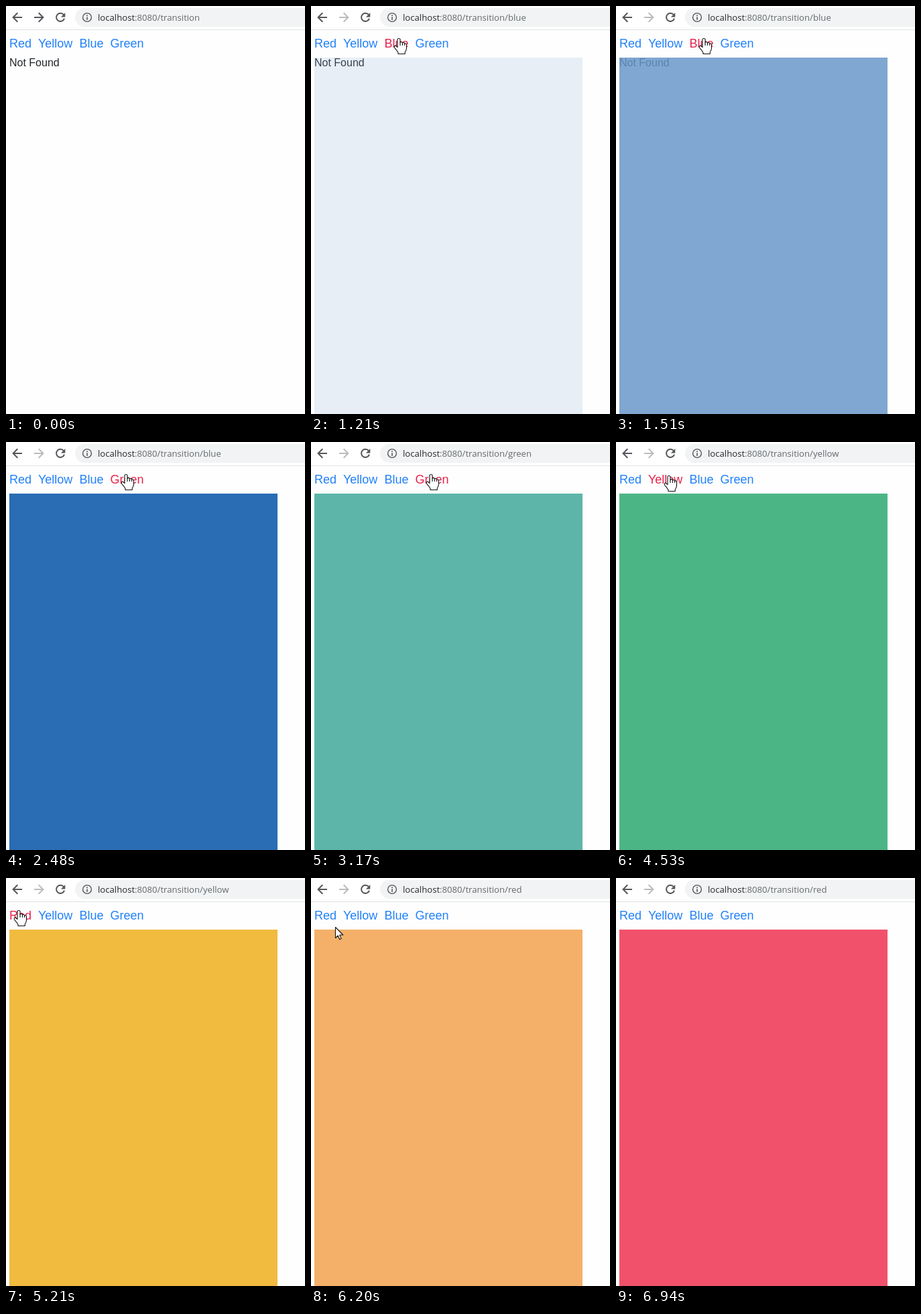
An HTML page for the animation above (7210 ms loop, 446x609 px).

```html
<!DOCTYPE html>
<html lang="en">
<head>
<meta charset="utf-8">
<title>Route transition</title>
<style>
html, body { margin: 0; width: 100%; height: 100%; overflow: hidden; background: #fefefe; }
svg { display: block; }
.icon { fill: none; stroke: #54575b; stroke-width: 2; }
.url { font: 13.15px "Open Sans", "Noto Sans", sans-serif; fill: #666a6e; }
.host { fill: #27282b; }
.link { font: 18px "Liberation Sans", Arial, sans-serif; fill: #2080f8; }
.link.hover { fill: #e6214b; }
.plain { font: 16px "Liberation Sans", Arial, sans-serif; fill: #212529; }
#cursor path { fill: #fff; stroke: #111; stroke-width: 1.1; stroke-linejoin: round; }
#hand .knuckles { fill: none; }
</style>
</head>
<body>
<svg width="446" height="609" viewBox="0 0 446 609">
  <rect width="446" height="35" fill="#fff"/>
  <rect y="35" width="446" height="1" fill="#dfe1e3"/>
  <rect x="103" y="3" width="380" height="28" rx="14" fill="#f1f3f4"/>
  <path class="icon" d="M24 17H11M17.3 10.3L10.6 17L17.3 23.7"/>
  <path class="icon" id="forward" d="M42 17H55M48.7 10.3L55.4 17L48.7 23.7"/>
  <path class="icon" d="M86 13A6.1 6.1 0 1 0 87 18.6"/>
  <path d="M88.3 10V16.4H81.9Z" fill="#54575b"/>
  <circle class="icon" cx="121" cy="17" r="6.4" style="stroke-width:1.4"/>
  <path d="M120.2 13.3h1.6v1.6h-1.6zM120.2 16.3h1.6v4.4h-1.6z" fill="#54575b"/>
  <text class="url" x="137" y="22"><tspan class="host">localhost</tspan>:8080/transition<tspan id="route"></tspan></text>

  <text class="link" x="5" y="62">Red</text>
  <text class="link" x="48" y="62">Yellow</text>
  <text class="link" x="109.5" y="62">Blue</text>
  <text class="link" x="155.5" y="62">Green</text>

  <g class="view"><text class="plain" x="5" y="90">Not Found</text></g>
  <rect class="view" x="5" y="77" width="400" height="532" fill="#2a6db4"/>
  <rect class="view" x="5" y="77" width="400" height="532" fill="#2aae82"/>
  <rect class="view" x="5" y="77" width="400" height="532" fill="#f1bb40"/>
  <rect class="view" x="5" y="77" width="400" height="532" fill="#f2516c"/>

  <g id="cursor">
    <path id="arrow" d="M.5 .5V16.5L4.2 13L6.7 18.7L9.2 17.6L6.7 12H11.8Z"/>
    <g id="hand">
      <path d="M-2 1.6Q0-1 2 1.6V6.2Q4.4 4.6 5.5 7Q7.7 5.6 8.6 8Q11.2 7.2 11.5 10V15Q11.4 18 9.2 21V23.5H-1V21.5Q-2.6 18.5-6 14.8Q-8 11.2-5 11L-2 13.6Z"/>
      <path class="knuckles" d="M2 6V11M5.5 7V11M8.6 8V11"/>
    </g>
  </g>
</svg>
<script>
const LOOP = 7210;
const $ = id => document.getElementById(id);
const links = [...document.querySelectorAll('.link')];
const views = [...document.querySelectorAll('.view')];
const spans = [[5, 38], [48, 99.5], [109.5, 145.5], [155.5, 205.5]];

// click time, fade start, fade end
const visits = [
  { route: '', click: 0, from: -2, to: -1 },
  { route: '/blue', click: 1040, from: 1040, to: 1880 },
  { route: '/green', click: 2760, from: 2760, to: 3520 },
  { route: '/yellow', click: 4330, from: 4420, to: 5030 },
  { route: '/red', click: 5950, from: 5950, to: 6800 }
];

// time, x, y of the pointer's hot spot
const path = [
  [180, 378, 596], [660, 143, 44], [810, 131, 48],
  [2140, 131, 48], [2480, 179, 48],
  [3640, 179, 48], [4130, 79, 50],
  [4640, 79, 50], [5210, 19, 48],
  [6130, 19, 48], [6660, 374, 560], [6730, 392, 612]
];

const clamp = v => Math.min(1, Math.max(0, v));
const smooth = v => v * v * (3 - 2 * v);
const show = (el, on) => el.style.display = on ? '' : 'none';

function pointer(t) {
  const i = path.findIndex(k => k[0] > t);
  if (i < 1) return null;
  const [a, b] = [path[i - 1], path[i]];
  const p = smooth((t - a[0]) / (b[0] - a[0]));
  return [a[1] + (b[1] - a[1]) * p, a[2] + (b[2] - a[2]) * p];
}

function draw(t) {
  const shown = visits.map(v => smooth(clamp((t - v.from) / (v.to - v.from))));
  views.forEach((el, i) => el.setAttribute('opacity', shown[i] * (1 - (shown[i + 1] || 0))));

  $('route').textContent = visits.filter(v => v.click <= t).pop().route;
  $('forward').style.stroke = t < visits[1].click ? '' : '#babcbe';

  const pos = pointer(t);
  const over = pos && pos[1] > 43 && pos[1] < 68
    ? spans.findIndex(([l, r]) => pos[0] >= l && pos[0] <= r) : -1;
  links.forEach((el, i) => el.classList.toggle('hover', i === over));
  show($('cursor'), pos);
  show($('hand'), over >= 0);
  show($('arrow'), over < 0);
  if (pos) $('cursor').setAttribute('transform', `translate(${pos.map(Math.round)})`);
}

const start = performance.now();
function tick() {
  draw((performance.now() - start) % LOOP);
  requestAnimationFrame(tick);
}
tick();
</script>
</body>
</html>
```
